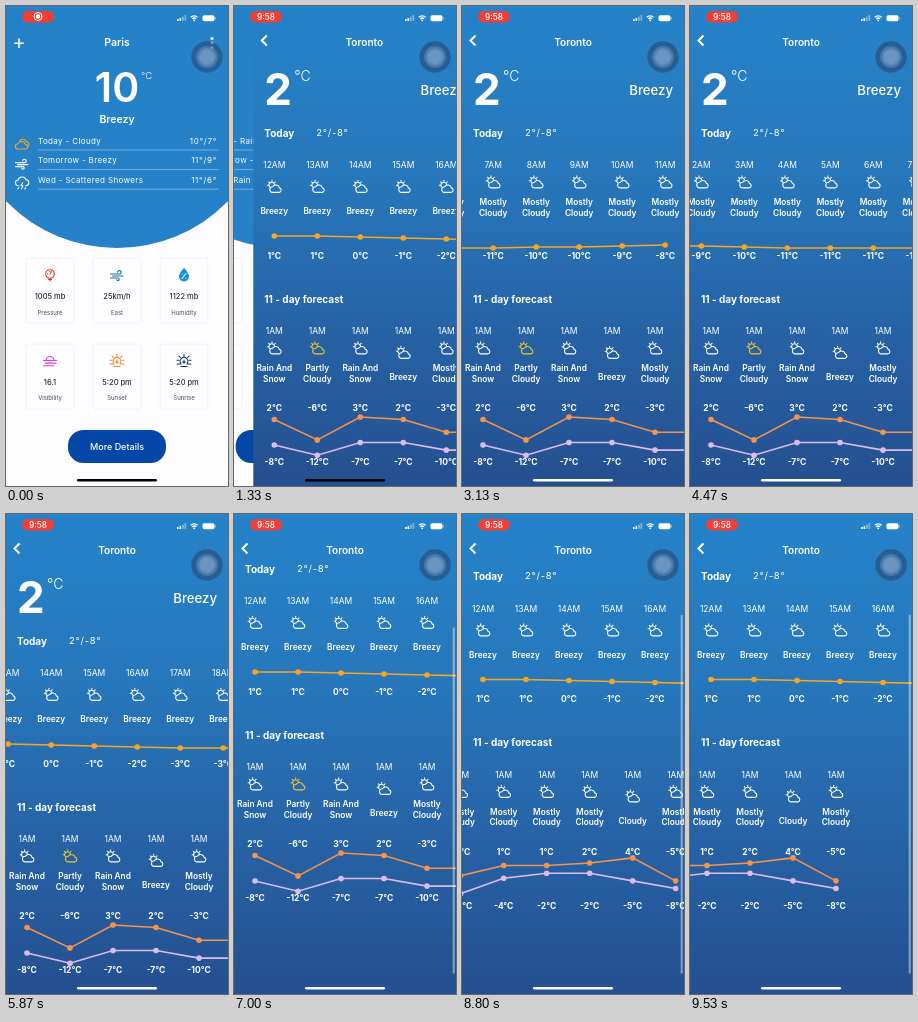
An HTML page for the animation above (9590 ms loop, 222 by 480 pixels).

```html
<!DOCTYPE html>
<html lang="en">
<head>
<meta charset="utf-8">
<title>Weather app</title>
<style>
  html, body { margin: 0; width: 100%; height: 100%; overflow: hidden; background: #fdfcff; }
  svg { display: block; width: 100vw; height: 100vh; }
  text { font-family: Inter, Roboto, sans-serif; }
  .icon { fill: none; stroke-width: 1.1; stroke-linecap: round; stroke-linejoin: round; }
</style>
</head>
<body>
<svg id="stage" viewBox="0 0 222 480"></svg>
<script>
const LOOP = 9590, STEP = 43, FIRST_X = 21, MAX_SCROLL = 64.5;

// y is the middle of the capitals
function label(x, y, size, str, { anchor = 'middle', weight = 400, fill = '#fff', spacing = 0 } = {}) {
  return `<text x="${x}" y="${y + size * 0.36}" font-size="${size}" font-weight="${weight}"
    text-anchor="${anchor}" fill="${fill}" letter-spacing="${spacing}">${str}</text>`;
}

const icons = {
  partly: `<path d="M-1.8 5.4a2.8 2.8 0 0 1 .1-5.6a3.7 3.7 0 0 1 6.8 1.1a2.300 2.300 0 0 1-.2 4.500z
    M-4.300 .4a2.900 2.900 0 1 1 4.600-3M-2.300-6.600v.7M-5.600-5.200l.5.5M-6.900-1.800h.7M1-5.200l-.5.5"/>`,
  clouds: `<path d="M-4 5a2.6 2.6 0 0 1 0-5.2a4 4 0 0 1 7.5 .8a2.2 2.2 0 0 1 0 4.4z
    M-2.5-2.6a3.8 3.8 0 0 1 7 .5a2.4 2.4 0 0 1 1.4 4.4"/>`,
  wind: `<path d="M-6.5-1h9a1.7 1.7 0 1 0-1.7-1.8M-4.5 1h10.5M-6.5 3h7.5a1.3 1.3 0 1 1-1.3 1.5"/>`,
  rain: `<path d="M-3.5 2.5a2.8 2.8 0 0 1-.5-5.6a4.2 4.2 0 0 1 8-.3a2.9 2.9 0 0 1-.3 5.9
    M.8-.5l-2 3h2.2l-1.5 3M-3.5 4.5l-.6 1.3M3.5 4.5l-.6 1.3"/>`,
  gauge: `<circle cy="-1" r="4.3"/><path d="M0-1l1.5-2.2M-1.5 4.5h3M0 3.5v2.5M-2.5-1h.2M0-3.7v.2"/>`,
  drop: `<path d="M0-6.5c3 3.5 4.5 5.3 4.5 8a4.5 4.5 0 0 1-9 0c0-2.7 1.5-4.5 4.5-8z" fill="#1591dc"/>
    <path d="M2-1.5l-4 5M-1.8-1h.1M1.8 3h.1" stroke="#fff"/>`,
  fog: `<path d="M-4 0a4 4 0 0 1 8 0M-6.5 0h13M-5 2.6h11M-6.5 5.2h10"/>`,
  sun: `<path d="M-3 3a3.8 3.8 0 1 1 6 0M-7 3.5h4M3 3.5h4M-3 6h6M0-6.5v1.8M-5-4.3l1.2 1.2
    M5-4.3l-1.2 1.2M-7-.2h1.7M7-.2h-1.7M0-.5v3M-1.2 1.3l1.2 1.3l1.2-1.3"/>`
};
const icon = (name, x, y, color = '#fff') =>
  `<g class="icon" stroke="${color}" transform="translate(${x} ${y})">${icons[name]}</g>`;

/* Home screen */
function cityView({ city, temp, sky, rows, cards }) {
  const left = { anchor: 'start', spacing: 0.37 };
  const looks = [['gauge', '#e0352b'], ['wind', '#1c6ea6'], ['drop', '#1591dc'],
    ['fog', '#d83be4'], ['sun', '#ee8a2a'], ['sun', '#173d63']];
  return label(111, 36, 10.5, city, { weight: 600 })
    + label(111, 81, 41, temp, { weight: 600 })
    + label(135, 70, 9.5, '°C', { anchor: 'start', weight: 300 })
    + label(111, 113, 10.5, sky, { weight: 600 })
    + rows.map(([name, color, text, range], i) => {
        const y = 135 + i * 19.6;
        return icon(name, 16, y + 3, color) + label(32, y, 8, text, left)
          + label(211, y, 8, range, { anchor: 'end', spacing: 0.7 })
          + `<path d="M32 ${y + 9}H213" stroke="#fff" stroke-opacity=".45" stroke-width=".8"/>`;
      }).join('')
    + cards.map(([value, name], i) => {
        const x = 44 + i % 3 * 67, y = i < 3 ? 269 : 354.5, [look, color] = looks[i];
        return icon(look, x, y, color)
          + label(x, y + 21.5, 7.5, value, { weight: 500, fill: '#2b2f3a' })
          + label(x, y + 37.5, 6, name, { fill: '#4b4f59' });
      }).join('');
}

const paris = {
  city: 'Paris', temp: 10, sky: 'Breezy',
  rows: [['clouds', '#f5a623', 'Today - Cloudy', '10°/7°'],
    ['wind', '#fff', 'Tomorrow - Breezy', '11°/9°'],
    ['rain', '#fff', 'Wed - Scattered Showers', '11°/6°']],
  cards: [['1005 mb', 'Pressure'], ['25km/h', 'East'], ['1122 mb', 'Humidity'],
    ['16.1', 'Visibility'], ['5:20 pm', 'Sunset'], ['5:20 pm', 'Sunrise']]
};
const toronto = {
  city: 'Toronto', temp: 2, sky: 'Breezy',
  rows: [['rain', '#fff', 'Today - Rain And Snow', '2°/-8°'],
    ['clouds', '#f5a623', 'Tomorrow - Partly Cloudy', '-6°/-12°'],
    ['rain', '#fff', 'Wed - Rain And Snow', '3°/-7°']],
  cards: [['1009 mb', 'Pressure'], ['32km/h', 'West'], ['1015 mb', 'Humidity'],
    ['16.1', 'Visibility'], ['5:01 pm', 'Sunset'], ['7:12 am', 'Sunrise']]
};

const cardFrames = [0, 1, 2, 3, 4, 5].map(i =>
  `<rect x="${20 + i % 3 * 67}" y="${i < 3 ? 252 : 338}" width="48" height="65" rx="3"
    fill="#fefdff" stroke="#f3f2f7"/>`).join('');

const home = `<rect width="222" height="480" fill="#fdfcff"/>
  <circle cx="111" cy="87" r="155" fill="#2581c8"/>${cardFrames}
  <path d="M13 32.5v9.4M8.3 37.2h9.4" stroke="#fff" stroke-width="1.6"/>
  ${[32.5, 37, 41.5].map(y => `<circle cx="206" cy="${y}" r="1.5" fill="#fff"/>`).join('')}
  <g id="cityA">${cityView(paris)}</g><g id="cityB">${cityView(toronto)}</g>
  <g id="button"><rect x="62" y="424" width="98" height="33" rx="15.5" fill="#0547a7"/>
  ${label(111, 440.5, 9, 'More Details', { weight: 500 })}</g>`;

/* Detail screen */
function column(i, top, time, sky, color) {
  const x = FIRST_X + i * STEP, lines = sky.split('|'), two = lines.length > 1;
  return label(x, top + 0.3, 8.5, time)
    + icon('partly', x, top + (two ? 17.5 : 22), color)
    + lines.map((s, n) => label(x, top + (two ? 37.2 + n * 10.8 : 46.5), 8.3, s, { weight: 600 })).join('');
}

function chart(temps, yOf, labelY, color) {
  const pts = temps.map((v, i) => [FIRST_X + i * STEP, yOf(v)]);
  return `<polyline points="${pts.join(' ')}" fill="none" stroke="${color}" stroke-width="1.6"/>`
    + pts.map(([x, y], i) => `<circle cx="${x}" cy="${y}" r="2.8" fill="${color}"/>`
      + label(x, labelY, 8.5, temps[i] + '°C', { weight: 700 })).join('');
}

const hourTemps = [1, 1, 0, -1, -2, -3, -3, -4, -5, -6, -7, -8, -9, -9, -9, -10,
  -11, -11, -11, -11, -10, -10, -9, -8];
const hours = hourTemps.map((_, i) => column(i, 159, (i < 12 ? 12 + i : i - 12 || 12) + 'AM',
    i < 10 ? 'Breezy' : i < 14 ? 'Cloudy' : 'Mostly|Cloudy')).join('')
  + chart(hourTemps, v => 231 - v, 249.5, '#f6a623');

const highs = [2, -6, 3, 2, -3, -3, 1, 1, 2, 4, -5];
const lows = [-8, -12, -7, -7, -10, -10, -4, -2, -2, -5, -8];
const skies = { 0: 'Rain And|Snow', 1: 'Partly|Cloudy', 2: 'Rain And|Snow', 3: 'Breezy', 9: 'Cloudy' };
const dayY = v => 418.6 - 2.55 * v;
const days = highs.map((_, i) =>
    column(i, 325, '1AM', skies[i] || 'Mostly|Cloudy', i === 1 ? '#f5c52c' : '#fff')).join('')
  + chart(highs, dayY, 402, '#f3934c') + chart(lows, dayY, 456, '#dcbcec');

const start = { anchor: 'start' };
const detail = `<rect width="222" height="480" fill="url(#sky)"/>
  <g clip-path="url(#body)"><g id="page">
    ${label(11, 83, 44, '2', { ...start, weight: 700 })}
    ${label(41, 70, 14, '°C', { ...start, weight: 300 })}
    ${label(211, 84, 13.2, 'Breezy', { anchor: 'end', weight: 500 })}
    ${label(11, 127, 10, 'Today', { ...start, weight: 700 })}
    ${label(63, 126.5, 9.5, '2°/-8°', { ...start, spacing: 0.7 })}
    <g id="hours">${hours}</g>
    ${label(11, 293, 10, '11 - day forecast', { ...start, weight: 700 })}
    <g id="days">${days}</g>
  </g></g>
  <rect id="bar" x="218.7" width="2" rx="1" fill="#fff"/>
  <path d="M13.5 29.5l-5 5l5 5" fill="none" stroke="#fff" stroke-width="2"/>
  ${label(111, 36, 10.1, 'Toronto', { weight: 600 })}`;

/* Phone overlay */
const overlay = `<rect x="16" y="5" width="32" height="11.5" rx="5.7" fill="#f03f36"/>
  <g id="record"><circle cx="32" cy="10.5" r="4" fill="none" stroke="#fff"/>
    <circle cx="32" cy="10.5" r="2.2" fill="#fff"/></g>
  <g id="clock">${label(32, 10.7, 8.3, '9:58', { weight: 500 })}</g>
  ${[2, 3, 4.5, 6].map((h, i) => `<rect x="${171 + i * 2.5}" y="${15 - h}" width="1.7"
    height="${h}" rx=".5" fill="#fff" opacity="${i < 2 ? 1 : 0.4}"/>`).join('')}
  <path d="M184.8 11.2a4.8 4.8 0 0 1 6.8 0M186.3 12.9a2.7 2.7 0 0 1 3.8 0"
    fill="none" stroke="#fff" stroke-width="1.3"/><circle cx="188.2" cy="14.3" r=".9" fill="#fff"/>
  <rect x="196.5" y="9.2" width="12" height="6" rx="1.7" fill="#fff"/>
  <rect x="209" y="11.2" width="1" height="2" rx=".5" fill="#fff" opacity=".6"/>
  <circle cx="201" cy="51" r="15.7" fill="#26507f" opacity=".7"/>
  ${[11, 9, 7.2].map(r => `<circle cx="201" cy="51" r="${r}" fill="#8fb4da" opacity=".3"/>`).join('')}
  <rect id="indicator" x="71" y="473" width="80" height="2.5" rx="1.2"/>`;

document.getElementById('stage').innerHTML = `<defs>
  <linearGradient id="sky" x2="0" y2="1"><stop stop-color="#2583c9"/><stop offset=".35" stop-color="#2777bb"/>
    <stop offset="1" stop-color="#254f90"/></linearGradient>
  <clipPath id="body"><rect y="46" width="222" height="434"/></clipPath></defs>
  <g id="home">${home}</g><g id="detail">${detail}</g>${overlay}`;

/* Motion */
// Monotone cubic through [time, value] pairs
function track(keys) {
  const slope = i => (keys[i + 1][1] - keys[i][1]) / (keys[i + 1][0] - keys[i][0]);
  const tangent = i => {
    if (i === 0 || i === keys.length - 1) return 0;
    const a = slope(i - 1), b = slope(i);
    return a * b > 0 ? 2 * a * b / (a + b) : 0;
  };
  return t => {
    const i = keys.findIndex(k => k[0] > t) - 1;
    if (i === -2) return keys[keys.length - 1][1];
    if (i === -1) return keys[0][1];
    const [t0, a] = keys[i], [t1, b] = keys[i + 1], d = t1 - t0, u = (t - t0) / d;
    return a + (b - a) * u * u * (3 - 2 * u)
      + d * u * (1 - u) * (tangent(i) * (1 - u) - tangent(i + 1) * u);
  };
}

const swap = track([[200, 0], [500, 1]]);
const press = track([[720, 1], [820, 0.35], [920, 0.35], [1060, 1]]);
const push = track([[1020, 0], [1400, 1]]);
const recording = track([[700, 1], [1000, 0]]);
const hourScroll = track([[1500, 0], [2130, 375], [3200, 810], [3700, 810], [4470, 612], [5870, 62], [6250, 0]]);
const pageScroll = track([[6350, 0], [6850, 72], [7050, 72], [7350, MAX_SCROLL]]);
const dayScroll = track([[7450, 0], [8070, 91], [8900, 251], [9530, 305]]);
const indicatorLight = track([[1500, 0], [2130, 0.45], [2900, 1]]);

const el = id => document.getElementById(id);
const set = (id, attrs) => { for (const k in attrs) el(id).setAttribute(k, attrs[k]); };
const move = (id, x, y = 0) => set(id, { transform: `translate(${x} ${y})` });

function draw(t) {
  const shown = push(t), v = pageScroll(t), over = Math.max(0, v - MAX_SCROLL);
  const grey = Math.round(255 * indicatorLight(t));
  set('cityA', { opacity: 1 - swap(t) });
  set('cityB', { opacity: swap(t) });
  set('button', { opacity: press(t) });
  set('record', { opacity: recording(t) });
  set('clock', { opacity: 1 - recording(t) });
  move('home', -66 * shown);
  move('detail', 222 * (1 - shown));
  move('page', 0, -v);
  move('hours', -hourScroll(t));
  move('days', -dayScroll(t));
  set('bar', { y: 46 + 0.85 * (v - over) + 1.7 * over, height: 359 - 1.7 * over,
    opacity: 0.45 * Math.min(1, v / 5) });
  set('indicator', { fill: `rgb(${grey},${grey},${grey})` });
}

const begin = performance.now();
(function frame() {
  draw((performance.now() - begin) % LOOP);
  requestAnimationFrame(frame);
})();
</script>
</body>
</html>
```
